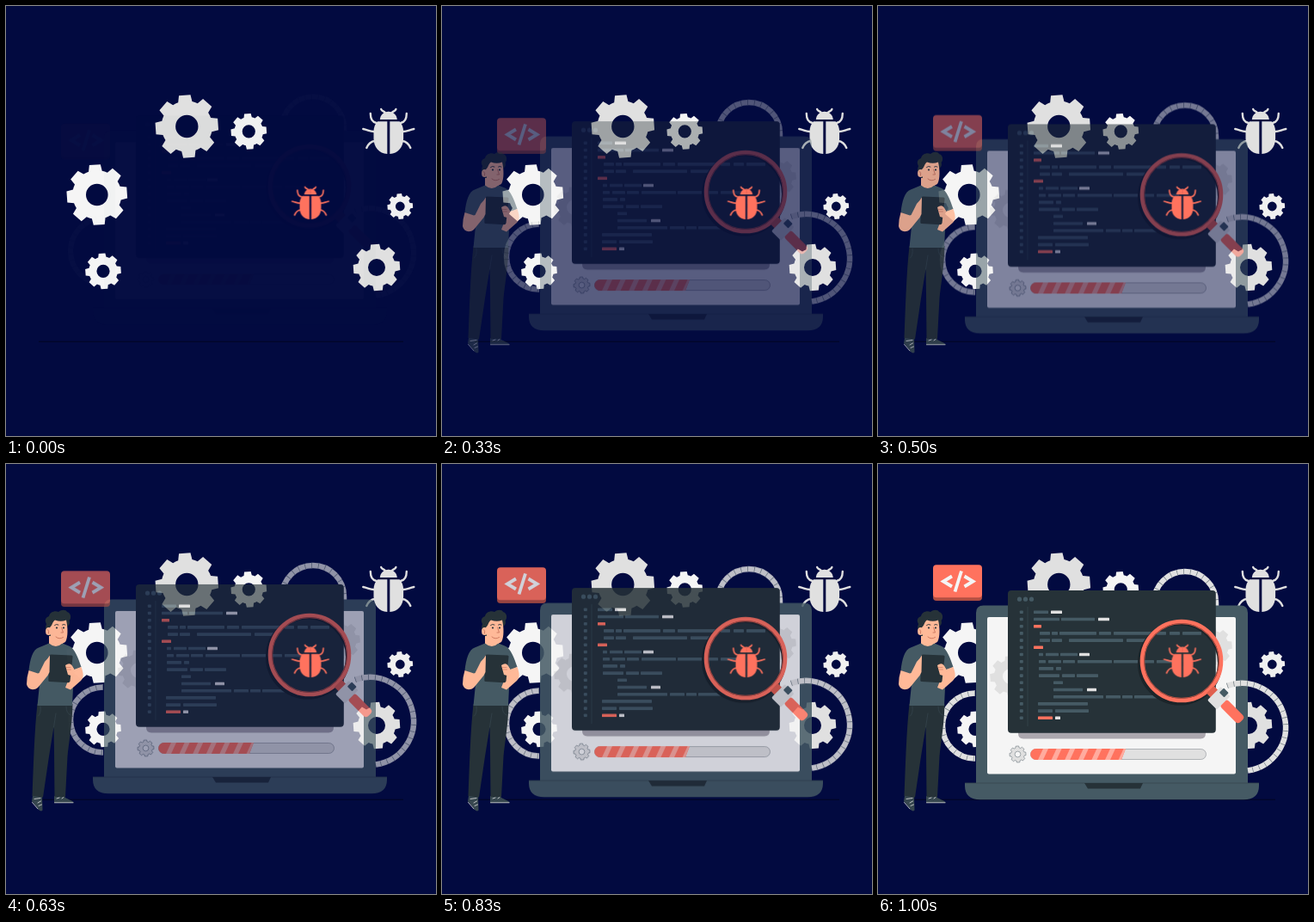
An HTML page that plays this animation: 500 by 500 pixels, repeating every 1040 ms.

```html
<!DOCTYPE html>
<html lang="en">
<head>
<meta charset="utf-8">
<title>Bug hunt</title>
<style>
  html, body { margin: 0; width: 100%; height: 100%; overflow: hidden; background: #020a40; }
  svg { display: block; width: 100%; height: 100%; }
  .line { fill: none; stroke-linecap: round; stroke-linejoin: round; }
</style>
</head>
<body>
<svg viewBox="0 0 500 500">
  <defs>
    <g id="halfBug">
      <path d="M-1.500 -11.800V26C-11 25.500 -17.300 18 -17.300 8V0C-17.300 -5 -15.500 -9 -12.800 -11.800Z"/>
      <path d="M.2 -14H-10C-9.500 -20 -5 -23.300 .2 -23.300Z"/>
      <path class="line" stroke="currentColor" stroke-width="2.400"
        d="M-4 -22C-5 -24 -8 -23.500 -8.600 -26M-14 -10C-20 -11 -21 -16 -21 -21M-17 0C-22 0 -24 -2 -29.500 -3M-16 11C-20 11 -24 15 -25.500 19"/>
    </g>
    <g id="bug" fill="currentColor">
      <use href="#halfBug"/>
      <use href="#halfBug" transform="scale(-1 1)"/>
    </g>
    <clipPath id="screenClip"><rect x="127" y="178" width="289" height="182.500"/></clipPath>
    <clipPath id="barClip"><path d="M183.700 331H288L283 344H183.700A6.500 6.500 0 0 1 183.700 331Z"/></clipPath>
  </defs>

  <rect x="38" y="389.800" width="424" height=".8" fill="#01041c"/>
  <g id="gears"></g>
  <use href="#bug" color="#e0e0e0" transform="translate(444.800 146)"/>

  <g id="laptop">
    <g id="cables"></g>
    <path fill="#455a64" d="M114 371V173Q114 164.500 122.500 164.500H421.500Q430 164.500 430 173V371Z"/>
    <rect x="127" y="178" width="289" height="182.500" rx="2" fill="#f5f5f5"/>
    <g id="backGears" clip-path="url(#screenClip)"></g>
    <path fill="#455a64" d="M101 371H443V374Q443 390.300 425 390.300H119Q101 390.300 101 374Z"/>
    <path stroke="#37474f" stroke-width=".8" d="M101 371H443"/>
    <path fill="#263238" d="M240 371H308L305 377.500H244Z"/>

    <path fill="#aba7ae" d="M163 310H381V313Q381 319.500 375 319.500H169Q163 319.500 163 313Z"/>
    <rect x="151" y="147" width="241.800" height="165.800" rx="4" fill="#263238"/>
    <path stroke="#37474f" stroke-width=".8" d="M174 166V305"/>
    <g id="code"></g>

    <g id="status"></g>
    <rect x="177.500" y="331.500" width="204" height="12" rx="6" fill="#e0e0e0" stroke="#8a8f94" stroke-width=".6"/>
    <g id="bar" clip-path="url(#barClip)"></g>

    <g id="plug"></g>
    <g transform="translate(353 229)" fill="none">
      <circle cx="-2" cy="2.500" r="46.500" stroke="#1b2429" stroke-width="5"/>
      <circle r="46" stroke="#ff725e" stroke-width="4.600"/>
      <circle r="43.400" stroke="#b24f42" stroke-width="1.200"/>
      <g transform="rotate(45)">
        <rect x="47" y="-6" width="8" height="12" fill="#e0604e"/>
        <rect x="68" y="-5.800" width="30.500" height="11.600" rx="4" fill="#ff725e"/>
        <rect x="53.500" y="-11" width="15.500" height="22" rx="1.500" fill="#e0e0e0"/>
        <rect x="57" y="-12.500" width="8" height="7.500" rx="1" fill="#455a64"/>
      </g>
    </g>
  </g>

  <g id="tag">
    <rect x="64" y="119" width="57" height="40" rx="4" fill="#b24f42"/>
    <rect x="64" y="117.300" width="57" height="38" rx="4" fill="#ff725e"/>
    <path fill="none" stroke="#f5f5f5" stroke-width="3.800"
      d="M86 130.500L76 136.500L86 142.500M97 124.500L89.500 148.500M100.500 130.500L110.500 136.500L100.500 142.500"/>
  </g>

  <g id="man">
    <path fill="#37474f" d="M31 386H42L42.500 402.500Q40.500 405.500 36.500 400L30 392ZM56 386H67C70 390 77 390.500 79 394H56Z"/>
    <path class="line" stroke="#e0e0e0" stroke-width=".8" d="M33 389.500L40 388.500M37 394L40.500 392M38 397.500L41.500 396M59 389L62 388M65 389L67 387.500M30.500 393.500L37 401M56.500 393.800H78"/>
    <path fill="#263238" d="M36.500 279H77.500C77 303 73 324 71.500 340L69 387H56.500L56 335L55.500 306L50 340L43 387.500L30.500 386C32 350 33 310 36.500 279Z"/>
    <path class="line" stroke="#37474f" stroke-width=".7" d="M55.500 306L58 290M70 282Q70 290 75 292M40 282Q41 290 37.500 293"/>
    <path fill="#ffb998" d="M50 198H66V210Q59 217 50 211Z"/>
    <path fill="#455a64" d="M38 213.500L50 208.500Q58 215.500 65.500 208.500L73 211.500C80 214 84 226 87.500 236L79 240L77 281H36.500L40 246L26.500 240C28 227 31 216 38 213.500Z"/>
    <path fill="#263238" d="M47.500 196C45 191 46.500 188 47 186C44 181 47 178 50 177C51 172 57 170 61 172C65 168.500 70 169.500 71 172C76 173 76 180 73.500 182C75 186 72 189 70 189L68 200H50Z"/>
    <path fill="#ffb998" d="M51 190C54 188 54 183 57 181.500Q64 184 70 181.500C72 190 72.300 201 69.300 206.500C65 211 56 209 52 201Z"/>
    <ellipse cx="49.500" cy="194.500" rx="3.400" ry="4.600" fill="#ffb998"/>
    <circle cx="59" cy="190.500" r="1.100" fill="#263238"/>
    <circle cx="67" cy="190.500" r="1.100" fill="#263238"/>
    <path class="line" stroke="#263238" stroke-width=".9" d="M56.500 187.500Q58.500 185.500 61 187M65.500 187Q67 185.800 69 187"/>
    <path class="line" stroke="#c9745c" stroke-width=".9" d="M64.500 190L66.500 196H64M58 201Q62 204.500 66.500 201.500M48.500 192.500Q50.500 193.500 49.500 197"/>
    <path fill="#ffb998" d="M79 239L87.500 236C90 243 91 248 87 252L75 262.500L69 260L74 247L68 240Q68 232 74 233Q78 235 79 239Z"/>
    <path fill="#263238" d="M52 221.500L76 222.500Q78 222.500 77.500 224.500L74.500 252.500Q74 254.500 72 254.300L50.500 253Q49 252.800 49.300 251L50.500 223Q50.700 221.500 52 221.500Z"/>
    <path fill="#ffb998" d="M26.500 240L37 243.500L38.500 243L45 230Q49 226 51 222.500L50.500 242Q49 246 46 249L37 260C32 264 25.500 262.500 24 256Q24 248 26.500 240ZM69 234Q74 230.500 76.500 234L80 240L79 247L72 245Z"/>
    <path class="line" stroke="#c9745c" stroke-width=".6" d="M70 236.500H75M70.500 239H75.500"/>
  </g>

  <use href="#bug" color="#ff725e" transform="translate(353.900 229.300) scale(.72)"/>
</svg>

<script>
const $ = id => document.getElementById(id);
const add = (id, markup) => $(id).insertAdjacentHTML('beforeend', markup);
const rect = (x, y, w, h, fill, r = 0) =>
  `<rect x="${x}" y="${y}" width="${w}" height="${h}" rx="${r}" fill="${fill}"/>`;

// Wheel with eight tapered teeth and a round hole
function gear(cx, cy, r, hole, fill, extra = '') {
  const at = (radius, deg) => {
    const a = (deg - 94) * Math.PI / 180;
    return `${(cx + radius * Math.cos(a)).toFixed(2)} ${(cy + radius * Math.sin(a)).toFixed(2)}`;
  };
  const body = r * 0.8;
  let d = '';
  for (let a = 0; a < 360; a += 45) {
    d += `${a ? 'L' : 'M'}${at(body, a - 16)}L${at(r, a - 10.5)}L${at(r, a + 10.5)}L${at(body, a + 16)}`;
    d += `A${body} ${body} 0 0 1 ${at(body, a + 29)}`;
  }
  d += `ZM${cx - hole} ${cy}a${hole} ${hole} 0 1 0 ${2 * hole} 0a${hole} ${hole} 0 1 0 ${-2 * hole} 0Z`;
  return `<path d="${d}" fill="${fill}" fill-rule="evenodd" ${extra}/>`;
}

const cable = d => `<path d="${d}" fill="none" stroke="#e0e0e0" stroke-width="6.500"/>
  <path d="${d}" fill="none" stroke="#7d878d" stroke-width="6.500" stroke-dasharray=".8 7"/>`;

add('gears', [
  gear(210.3, 140, 37, 13.2, '#e0e0e0'),
  gear(282.3, 145.8, 21, 7.6, '#f5f5f5'),
  gear(105.8, 219.5, 35.6, 12.8, '#f5f5f5'),
  gear(113, 308.3, 21, 7.6, '#f5f5f5'),
  gear(431, 304, 27.5, 10, '#e0e0e0'),
  gear(458.3, 233, 15, 5.4, '#f0f0f0')
].join(''));
add('backGears', gear(390, 212, 22, 8, '#e0e0e0') + gear(154, 247, 24, 9, '#e0e0e0'));
add('cables', cable('M113 266.500A38 38 0 0 0 113 342.500') +
  cable('M321 161A36 36 0 0 1 393 161V166'));
add('plug', cable('M406 257.900A51 51 0 1 1 430 356.500'));
add('status', gear(162.5, 337.5, 9.6, 3.4, '#e0e0e0', 'stroke="#7d878d" stroke-width=".7"'));

add('bar', rect(177, 331, 112, 13, '#ff725e'));
for (let x = 186; x < 288; x += 15.6) {
  add('bar', `<path fill="#ffab9e" d="M${x} 344l6 -13h6l-6 13Z"/>`);
}

// Each dash is "start-end", with an optional colour letter
const rows = [
  '181-198 201-214w', '181-211 213-252 256-269w', '181-190o',
  '188-200 202-209 211-254 257-271 274-322 324-335 339-351 354-376',
  '188-200 202-214 222-285 289-313', '181-192o',
  '187-192 195-210 212-232 234-246w',
  '187-195 198-213 215-229 232-272 274-306 309-321 324-350',
  '187-204 207-213', '187-211 214-229 231-256', '204-215', '204-238 243-254w',
  '204-262 265-282 284-296 298-330', '186-244', '186-203 206-245', '186-203o 206-212w'
];
const ink = { o: '#ff725e', w: '#e0e0e0', '': '#455a64' };
rows.forEach((row, i) => {
  const y = 170.5 + 8.2 * i;
  add('code', rect(164.8, y, 4, 3.6, '#455a64', .8));
  for (const [, from, to, key] of row.matchAll(/(\d+)-(\d+)(\w?)/g)) {
    add('code', rect(from, y, to - from, 3.6, ink[key], .6));
  }
});
for (const x of [164.5, 171.5, 178.5]) {
  add('code', `<circle cx="${x}" cy="157.200" r="2.600" fill="#455a64"/>`);
}

// Entrances: slide and fade, scrubbed at 24 steps per second
const LOOP = 1040, STEPS = 24;
const enter = (id, shift, duration, easing) => {
  const anim = $(id).animate([
    { opacity: 0, transform: `translateY(${shift}px)` },
    { opacity: 1, transform: 'translateY(0px)' }
  ], { duration, easing, fill: 'both' });
  anim.pause();
  return anim;
};
const entrances = [
  enter('laptop', -20, 1000, 'linear'),
  enter('tag', 20, 1000, 'linear'),
  enter('man', 0, 700, 'ease-in-out')
];

const start = performance.now();
function draw(now) {
  const t = Math.max(0, now - start) % LOOP;
  let step = STEPS;
  while (step > 0 && Math.round(step * 100 / STEPS) * 10 > t) step--;
  // Each step shows the pose at its middle
  for (const anim of entrances) anim.currentTime = (step + 0.5) * 1000 / STEPS;
  requestAnimationFrame(draw);
}
draw(start);
</script>
</body>
</html>
```
